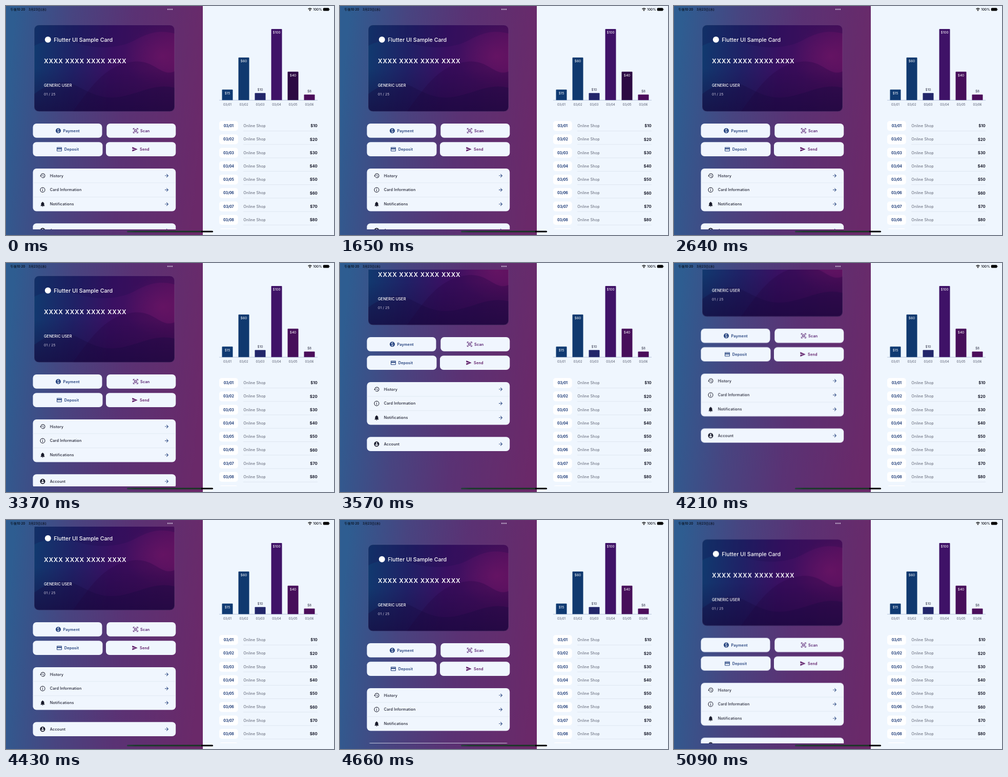
Animation, 640 px wide and 448 px high, one loop 5150 ms. Source, as an HTML page:

```html
<!DOCTYPE html>
<html lang="en">
<head>
<meta charset="utf-8">
<title>Card dashboard</title>
<style>
  html, body { margin: 0; width: 100%; height: 100%; overflow: hidden; background: #eff6fe; }
  svg { display: block; width: 640px; height: 448px; }
  text { font-family: Inter, "Noto Sans CJK JP", "Noto Sans CJK", sans-serif; white-space: pre; }
</style>
</head>
<body>
<svg id="stage" viewBox="0 0 640 448" xmlns="http://www.w3.org/2000/svg">
  <defs>
    <linearGradient id="wall" gradientUnits="userSpaceOnUse" x1="0" y1="200" x2="384" y2="234">
      <stop offset="0" stop-color="#2e5d91"/>
      <stop offset=".3" stop-color="#484480"/>
      <stop offset=".6" stop-color="#5a3274"/>
      <stop offset="1" stop-color="#6a2969"/>
    </linearGradient>
    <linearGradient id="face" gradientUnits="userSpaceOnUse" x1="55" y1="100" x2="329" y2="130">
      <stop offset="0" stop-color="#11396f"/>
      <stop offset=".28" stop-color="#202166"/>
      <stop offset=".55" stop-color="#3a1062"/>
      <stop offset="1" stop-color="#540f5d"/>
    </linearGradient>
    <linearGradient id="shade" x1="0" y1="0" x2="0" y2="1">
      <stop offset="0" stop-color="#150638" stop-opacity="0"/>
      <stop offset=".5" stop-color="#150638" stop-opacity="0"/>
      <stop offset="1" stop-color="#150638" stop-opacity=".5"/>
    </linearGradient>
    <radialGradient id="glow">
      <stop offset="0" stop-color="#7a1868" stop-opacity=".5"/>
      <stop offset="1" stop-color="#7a1868" stop-opacity="0"/>
    </radialGradient>
    <linearGradient id="home" gradientUnits="userSpaceOnUse" x1="236" y1="0" x2="404" y2="0">
      <stop offset="0" stop-color="#27403f"/>
      <stop offset=".1" stop-color="#1b3b2c"/>
      <stop offset=".86" stop-color="#1b3526"/>
      <stop offset=".865" stop-color="#000"/>
    </linearGradient>
    <clipPath id="view"><rect y="13" width="384" height="423.5"/></clipPath>
    <clipPath id="rows"><rect x="384" y="13" width="256" height="423.5"/></clipPath>
    <clipPath id="cardEdge"><rect x="55" y="37" width="274" height="169.3" rx="9"/></clipPath>
  </defs>
  <rect width="640" height="448" fill="#eff6fe"/>
  <rect width="384" height="448" fill="url(#wall)"/>
  <g clip-path="url(#view)"><g id="page"></g></g>
  <g id="chart"></g>
  <g id="orders" clip-path="url(#rows)"></g>
  <g id="status"></g>
</svg>
<script>
const NS = 'http://www.w3.org/2000/svg';
const LOOP = 5150;
const NAVY = '#1b3a78', INK = '#191b2b', PANEL = '#f0f6fe';
const byId = id => document.getElementById(id);

function add(parent, tag, attrs) {
  const el = document.createElementNS(NS, tag);
  for (const k in attrs) el.setAttribute(k, attrs[k]);
  parent.append(el);
  return el;
}
const box = (p, x, y, width, height, rx, fill) =>
  add(p, 'rect', { x, y, width, height, rx, fill });
const line = (p, x1, x2, y, stroke) =>
  add(p, 'line', { x1, x2, y1: y, y2: y, stroke, 'stroke-width': 0.6 });

// cy is the middle of the capitals
function label(p, str, x, cy, size, weight, fill, anchor = 'start', gap = 0) {
  add(p, 'text', {
    x, y: cy + size * 0.363, fill, 'font-size': size, 'font-weight': weight,
    'text-anchor': anchor, 'letter-spacing': gap
  }).textContent = str;
}

const disc = 'M12 2C6.48 2 2 6.48 2 12s4.48 10 10 10 10-4.48 10-10S17.52 2 12 2z';
const icons = {
  arrow: 'M12 4l-1.41 1.41L16.17 11H4v2h12.17l-5.58 5.59L12 20l8-8z',
  history: 'M13 3c-4.97 0-9 4.03-9 9H1l3.89 3.89.07.14L9 12H6c0-3.87 3.13-7 7-7s7 3.13 7 7-3.13 7-7 7c-1.93 0-3.68-.79-4.94-2.06l-1.42 1.42C8.27 19.99 10.51 21 13 21c4.97 0 9-4.03 9-9s-4.03-9-9-9zm-1 5v5l4.28 2.54.72-1.21-3.5-2.08V8H12z',
  info: disc + 'M12 4a8 8 0 1 1 0 16 8 8 0 0 1 0-16zM11 7h2v2h-2zM11 11h2v6h-2z',
  bell: 'M12 22c1.1 0 2-.9 2-2h-4c0 1.1.89 2 2 2zm6-6v-5c0-3.07-1.64-5.64-4.5-6.32V4c0-.83-.67-1.5-1.5-1.5s-1.5.67-1.5 1.5v.68C7.63 5.36 6 7.92 6 11v5l-2 2v1h16v-1l-2-2z',
  account: disc + 'M12 5a3 3 0 1 1 0 6 3 3 0 0 1 0-6zM12 19.2c-2.5 0-4.71-1.28-6-3.22.03-1.99 4-3.08 6-3.08 1.99 0 5.97 1.09 6 3.08-1.29 1.94-3.5 3.22-6 3.22z',
  coin: disc + 'm1.41 16.09V20h-2.67v-1.93c-1.71-.36-3.16-1.46-3.27-3.4h1.96c.1 1.05.82 1.87 2.65 1.87 1.96 0 2.4-.98 2.4-1.59 0-.83-.44-1.61-2.67-2.14-2.48-.6-4.18-1.62-4.18-3.67 0-1.72 1.39-2.84 3.11-3.21V4h2.67v1.95c1.86.45 2.79 1.86 2.85 3.39H14.3c-.05-1.11-.64-1.87-2.22-1.87-1.5 0-2.4.68-2.4 1.64 0 .84.65 1.39 2.67 1.91s4.18 1.39 4.18 3.91c-.01 1.83-1.38 2.83-3.12 3.16z',
  scan: 'M2 2h6v2H4v4H2zM16 2h6v6h-2V4h-4zM2 16h2v4h4v2H2zM20 16h2v6h-6v-2h4zM6.5 6.5h11v11h-11zM8.5 8.5v7h7v-7zM10.5 10.5h3v3h-3z',
  credit: 'M20 4H4c-1.11 0-1.99.89-1.99 2L2 18c0 1.11.89 2 2 2h16c1.11 0 2-.89 2-2V6c0-1.11-.89-2-2-2zm0 14H4v-6h16v6zm0-10H4V6h16v2z',
  send: 'M2.01 21L23 12 2.01 3 2 10l15 2-15 2z'
};
const icon = (p, name, cx, cy, size, fill) => add(p, 'path', {
  d: icons[name], fill, 'fill-rule': 'evenodd',
  transform: `translate(${cx - size / 2} ${cy - size / 2}) scale(${size / 24})`
});

const page = byId('page');

function drawCard() {
  const art = add(page, 'g', { 'clip-path': 'url(#cardEdge)' });
  box(art, 55, 37, 274, 170, 0, 'url(#face)');
  add(art, 'ellipse', { cx: 305, cy: 98, rx: 75, ry: 60, fill: 'url(#glow)' });
  const wave = (d, fill, opacity) => add(art, 'path', { d, fill, opacity });
  wave('M55 37H329V54C290 44 270 58 245 70S180 84 150 76 90 60 55 78Z', '#1a0c4c', 0.22);
  wave('M130 207C165 160 190 120 240 110S300 140 329 128V207Z', '#2a0748', 0.35);
  wave('M55 172C80 154 105 143 130 153S180 184 220 178 290 150 329 160V207H55Z', '#170a42', 0.32);
  box(art, 55, 37, 274, 170, 0, 'url(#shade)');
  const rim = box(page, 55.2, 37.2, 273.6, 168.9, 9, 'none');
  rim.setAttribute('stroke', 'rgba(255,255,255,.22)');
  rim.setAttribute('stroke-width', 0.5);

  add(page, 'circle', { cx: 81.8, cy: 65.8, r: 6, fill: '#fff' });
  label(page, 'Flutter UI Sample Card', 93.3, 65.8, 10.7, 500, '#fff');
  label(page, 'XXXX XXXX XXXX XXXX', 74, 107.5, 12, 600, '#fff', 'start', 0.75);
  label(page, 'GENERIC USER', 74, 155.3, 7.5, 500, '#fff');
  label(page, '01 / 25', 74, 172.4, 6.5, 400, '#d9d3e6', 'start', 0.3);
}

function drawButtons() {
  const violet = '#511a6c';
  [
    ['Payment', 'coin', 52.5, 230, 135, 102, 111.5, NAVY],
    ['Scan', 'scan', 196.3, 230, 135, 252.8, 262, violet],
    ['Deposit', 'credit', 52.5, 266.3, 136, 104, 113.7, NAVY],
    ['Send', 'send', 195, 266.3, 136.3, 251.3, 261, '#5a1563']
  ].forEach(([str, name, x, y, w, ix, tx, color]) => {
    box(page, x, y, w, 27.8, 7, PANEL);
    icon(page, name, ix, y + 13.9, 11.8, color);
    label(page, str, tx, y + 13.9, 7.3, 600, color, 'start', 0.2);
  });
}

function drawMenu(y, items) {
  const step = 27.85;
  box(page, 52.5, y, 278.7, step * items.length, 7, PANEL);
  items.forEach(([str, name], i) => {
    const cy = y + step * (i + 0.5);
    if (i) line(page, 52.5, 331.2, cy - step / 2, '#d6dfeb');
    icon(page, name, 71.5, cy, 12, INK);
    label(page, str, 85.7, cy, 7.3, 500, INK, 'start', 0.2);
    icon(page, 'arrow', 313.5, cy, 10.6, NAVY);
  });
}

function drawChart() {
  const g = byId('chart'), base = 184.3;
  const colors = ['#0f3a72', '#10396f', '#22266a', '#3f1267', '#2c0a42', '#4b0d5a'];
  const bars = [15, 60, 10, 100, 40, 8].map((v, i) => {
    const x = 421.5 + 32 * i, h = v * 1.394, top = base - h, mid = x + 10.5;
    const bar = add(g, 'path', {
      d: `M${x} ${base}V${top + 1}q0-1 1-1h19q1 0 1 1V${base}z`, fill: colors[i]
    });
    const inside = v > 12;
    label(g, '$' + v, mid, inside ? top + 7 : top - 7, 6.5, 400, inside ? '#fff' : '#33364a', 'middle');
    label(g, '03/0' + (i + 1), mid, 192.5, 6, 400, '#555a6c', 'middle');
    return bar;
  });
  line(g, 416, 608, base, '#94a5c4');
  return bars;
}

function drawOrders() {
  const g = byId('orders');
  for (let i = 0; i < 9; i++) {
    const cy = 234.6 + 26.25 * i;
    box(g, 416, cy - 9.6, 36.7, 19.2, 5, '#fff');
    label(g, '03/0' + (i + 1), 434.4, cy, 6.9, 700, NAVY, 'middle');
    label(g, 'Online Shop', 463.3, cy, 7.2, 400, '#585d6d', 'start', 0.2);
    label(g, `$${i + 1}0`, 607.7, cy, 7.6, 700, INK, 'end');
    line(g, 463, 608, cy + 10, '#d2dae6');
  }
}

function drawStatus() {
  const g = byId('status');
  label(g, '午後10:20', 8.6, 6.6, 6.2, 500, '#05070f');
  label(g, '3月23日(水)', 44, 6.6, 6.2, 500, '#05070f');
  [316.2, 320, 323.8].forEach(cx => add(g, 'circle', { cx, cy: 6.6, r: 1.4, fill: '#bda9c9' }));
  [4.9, 3].forEach(r => add(g, 'path', {
    d: `M${593 - r * 0.72} ${9.4 - r * 0.72}a${r} ${r} 0 0 1 ${r * 1.44} 0`,
    fill: 'none', stroke: '#000', 'stroke-width': 1.1
  }));
  add(g, 'path', { d: 'M593 9.9l-1.5-1.6q1.5-1.3 3 0z' });
  label(g, '100%', 599.3, 6.6, 6.4, 500, '#05070f');
  box(g, 618.8, 3.8, 11.6, 5.8, 1.5, '#000');
  box(g, 630.9, 5.7, 0.8, 2, 0.4, '#000');
  box(g, 236, 439.8, 168, 3, 1.5, 'url(#home)');
}

// [ms, value] pairs, each held until the next
function hold(el, prop, steps) {
  const frames = steps.map(([t, v]) => ({ offset: t / LOOP, [prop]: v, easing: 'step-end' }));
  frames.push({ offset: 1, [prop]: steps[steps.length - 1][1] });
  return el.animate(frames, { duration: LOOP, iterations: Infinity });
}

drawCard();
drawButtons();
drawMenu(318, [['History', 'history'], ['Card Information', 'info'], ['Notifications', 'bell']]);
drawMenu(425.2, [['Account', 'account']]);
const bars = drawChart();
drawOrders();
drawStatus();

const scroll = [
  [0, 0], [3370, -12], [3470, -52], [3570, -85], [3680, -101], [3800, -106],
  [4100, -105], [4210, -101.5], [4310, -74], [4430, -30], [4550, 6],
  [4660, 11], [4780, 6], [4880, 3], [4990, 1.3], [5090, 0.6]
];
const runs = [
  hold(page, 'transform', scroll.map(([t, y]) => [t, `translate(0px, ${y}px)`])),
  hold(bars[4], 'fill', [[0, '#2c0a42'], [2310, '#470f5a']])
];
const start = performance.now();
runs.forEach(run => { run.startTime = start; });
</script>
</body>
</html>
```
